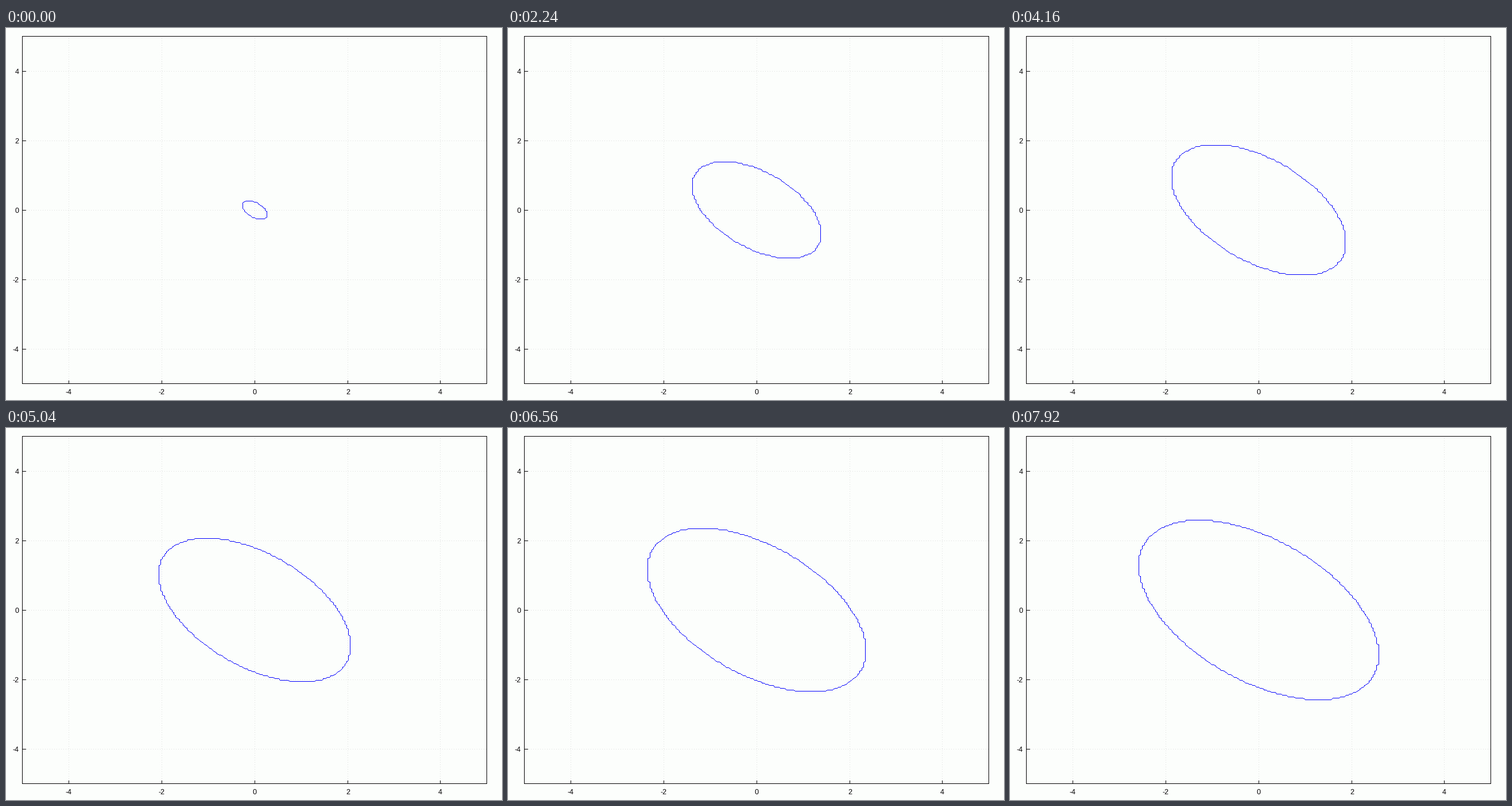
Recreate the animation shown at these times as a matplotlib script. Size 864x648 px, loop 8000 ms.

```python
import numpy as np
import matplotlib.pyplot as plt
from matplotlib.animation import FuncAnimation

W, H, DPI = 864, 648, 100
PX = 72 / DPI                       # one pixel in points
LEFT, RIGHT, TOP, BOTTOM = 28, 837.4, 14, 619
FRAMES, INTERVAL = 100, 80
STEP = 0.04                         # spacing of the sampling grid
PAPER, INK, GRID, BLUE = "#fcfefc", "#040204", "#dcdedc", "#0402fc"

plt.rcParams["path.simplify"] = False
plt.rcParams["font.family"] = "Liberation Sans"

fig = plt.figure(figsize=(W / DPI, H / DPI), dpi=DPI, facecolor=PAPER)
ax = fig.add_axes([0, 0, 1, 1])
ax.axis("off")


def to_px(x, y):
    """Plot coordinates to whole pixels."""
    px = LEFT + (np.asarray(x) + 5) * (RIGHT - LEFT) / 10
    py = TOP + (5 - np.asarray(y)) * (BOTTOM - TOP) / 10
    return np.floor(px + 0.5), np.floor(py + 0.5)


def stroke(xs, ys, color, **style):
    return ax.plot(xs, ys, color=color, lw=PX, snap=False,
                   solid_capstyle="butt", dash_capstyle="butt", **style)[0]


def hline(x0, x1, y, color, **style):
    stroke([x0, x1 + 1], [y + 0.5, y + 0.5], color, **style)


def vline(x, y0, y1, color, **style):
    stroke([x + 0.5, x + 0.5], [y0, y1 + 1], color, **style)


def crisp(x, y):
    """Turn a polyline into hard one-pixel dashes, without smoothing."""
    dx, dy = np.diff(x), np.diff(y)
    steps = np.maximum(abs(dx), abs(dy)).astype(int)
    seg = np.repeat(np.arange(len(steps)), steps)
    part = np.arange(len(seg)) - (np.cumsum(steps) - steps)[seg]
    part = part / steps[seg]
    px = np.floor(x[seg] + dx[seg] * part + 0.5)
    py = np.floor(y[seg] + dy[seg] * part + 0.5) + 0.5
    gap = np.full(len(seg), np.nan)
    return (np.column_stack([px, px + 1, gap]).ravel(),
            np.column_stack([py, py, gap]).ravel())


def outlines():
    """x^2 + xy + y^2 = t, traced through the midpoints of grid edges."""
    n = np.arange(-70, 71)
    i, j = np.meshgrid(n, n)
    norm = i * i + i * j + j * j
    paths = []
    for k in range(1, FRAMES + 1):
        inside = (4 * norm <= 125 * k).astype(float)   # t = 0.05 k
        contour = ax.contour(n, n, inside, levels=[0.5])
        loop = contour.allsegs[0][0] * STEP
        contour.remove()
        paths.append(crisp(*to_px(loop[:, 0], loop[:, 1])))
    return paths


def draw_axes():
    x0, y0 = to_px(-5, -5)
    x1, y1 = to_px(5, 5)
    dots = dict(linestyle=(0, (1, 3)), zorder=1)
    text = dict(fontsize=12.5 * PX, color=INK, va="baseline")
    for v in (-4, -2, 0, 2, 4):
        x, y = to_px(v, v)
        vline(x, y1, y0, GRID, **dots)
        hline(x0, x1, y, GRID, **dots)
        vline(x, y0 - 5, y0, INK)
        hline(x0, x0 + 6, y, INK)
        ax.text(x + 0.5, 638, str(v), ha="center", **text)
        ax.text(22.5, y + 5, str(v), ha="right", **text)
    for x in (x0, x1):
        vline(x, y1, y0, INK)
    for y in (y0, y1):
        hline(x0, x1, y, INK)


paths = outlines()
draw_axes()
curve = stroke([], [], BLUE, zorder=3)
ax.set_xlim(0, W)
ax.set_ylim(H, 0)


def update(frame):
    curve.set_data(*paths[frame])
    return [curve]


anim = FuncAnimation(fig, update, frames=FRAMES, interval=INTERVAL,
                     repeat=True, repeat_delay=0)
plt.show()
```
